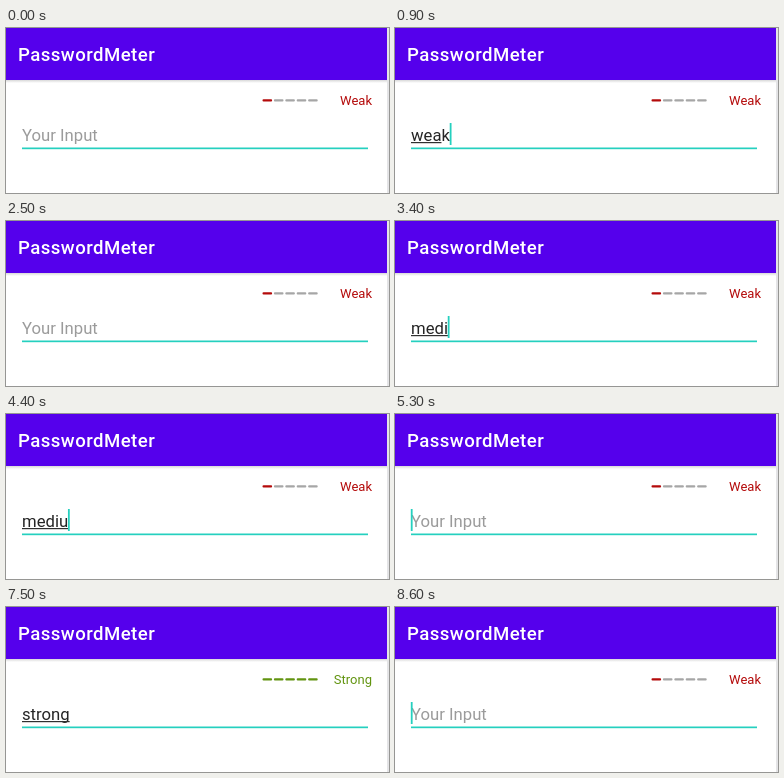
Animation, 383 px wide and 165 px high, one loop 9000 ms. Source, as an HTML page with a canvas:

```html
<!DOCTYPE html>
<html lang="en">
<head>
<meta charset="utf-8">
<title>PasswordMeter</title>
<style>
html, body { margin: 0; width: 100%; height: 100%; overflow: hidden; background: #fff; }
canvas { display: block; }
</style>
</head>
<body>
<canvas id="stage" width="383" height="165"></canvas>
<script>
const ctx = document.getElementById('stage').getContext('2d');
const LOOP = 9000;
const LEFT = 16;
const TEAL = '#25d0bf';

// Each step: start in ms, typed text, letters underlined, cursor shown.
const steps = [
  [0, '', 0, false],
  [300, 'w', 0, true], [400, 'w', 1, true],
  [500, 'we', 1, true], [600, 'we', 2, true],
  [800, 'wea', 2, true], [900, 'weak', 3, true], [1000, 'weak', 4, true],
  [1500, 'wea', 3, true], [1600, 'we', 2, true], [1800, 'w', 1, true],
  [2000, '', 0, true], [2500, '', 0, false],
  [2600, 'm', 0, true], [2800, 'me', 1, true], [3000, 'med', 2, true],
  [3200, 'medi', 3, true], [3300, 'medi', 4, true],
  [3600, 'mediu', 4, true], [3700, 'medium', 5, true], [3900, 'medium', 6, true],
  [4300, 'medium', 6, false],
  [4400, 'mediu', 5, true], [4600, 'medi', 4, true], [4800, 'med', 3, true],
  [5000, 'me', 2, true], [5100, 'm', 1, true],
  [5300, '', 0, true], [5800, '', 0, false],
  [5900, 's', 0, true], [6000, 's', 1, true],
  [6100, 'st', 1, true], [6200, 'st', 2, true],
  [6300, 'str', 2, true], [6400, 'str', 3, true],
  [6500, 'stro', 3, true], [6700, 'stron', 4, true],
  [6800, 'strong', 5, true], [7000, 'strong', 6, true], [7500, 'strong', 6, false],
  [7800, 'stron', 5, true], [8000, 'stro', 4, true], [8100, 'str', 3, true],
  [8300, 'st', 2, true], [8400, 's', 1, true], [8600, '', 0, true]
];

const levels = {
  weak: { label: 'Weak', bars: 1, color: '#b40a0a' },
  medium: { label: 'Medium', bars: 3, color: '#f08a00' },
  strong: { label: 'Strong', bars: 5, color: '#629410' }
};

function rect(x, y, w, h, color) {
  ctx.fillStyle = color;
  ctx.fillRect(x, y, w, h);
}

function write(text, x, y, font, color, align = 'left', spacing = 0) {
  ctx.font = font + ' Roboto, sans-serif';
  ctx.letterSpacing = spacing + 'px';
  ctx.textAlign = align;
  ctx.fillStyle = color;
  ctx.fillText(text, x, y);
}

function drawHeader() {
  rect(0, 0, 381, 52, '#5500ec');
  const shadow = ctx.createLinearGradient(0, 52, 0, 55);
  shadow.addColorStop(0, '#d8d8d8');
  shadow.addColorStop(1, '#ffffff');
  rect(0, 52, 381, 3, shadow);
  rect(381, 0, 2, 165, '#e4e4e6');
  write('PasswordMeter', 12, 33, '500 18.6px', '#fff', 'left', 0.45);
}

function drawMeter({ label, bars, color }) {
  for (let i = 0; i < 5; i++) {
    ctx.fillStyle = i < bars ? color : '#a6a6a6';
    ctx.beginPath();
    ctx.roundRect(256.5 + i * 11.4, 71.3, 9.6, 2.2, 1);
    ctx.fill();
  }
  write(label, 366, 77, '13px', color, 'right');
}

function drawInput(text, underlined, cursor) {
  const font = '16.7px';
  write(text || 'Your Input', LEFT, 113, font, text ? '#252525' : '#9b9b9b');
  const width = part => ctx.measureText(part).width;
  if (underlined) rect(LEFT, 114, width(text.slice(0, underlined)), 1.2, '#303030');
  rect(LEFT, 119.5, 346, 1.7, TEAL);
  if (cursor) rect(LEFT + width(text) - 0.2, 95, 1.8, 22, TEAL);
}

function frame(now) {
  const time = now % LOOP;
  const [, text, underlined, cursor] = steps.findLast(step => step[0] <= time);
  rect(0, 0, 383, 165, '#fff');
  drawHeader();
  drawMeter(levels[text] || levels.weak);
  drawInput(text, underlined, cursor);
  requestAnimationFrame(tick);
}

let start;
function tick(now) {
  start ??= now;
  frame(Math.max(0, now - start));
}
requestAnimationFrame(tick);
</script>
</body>
</html>
```
